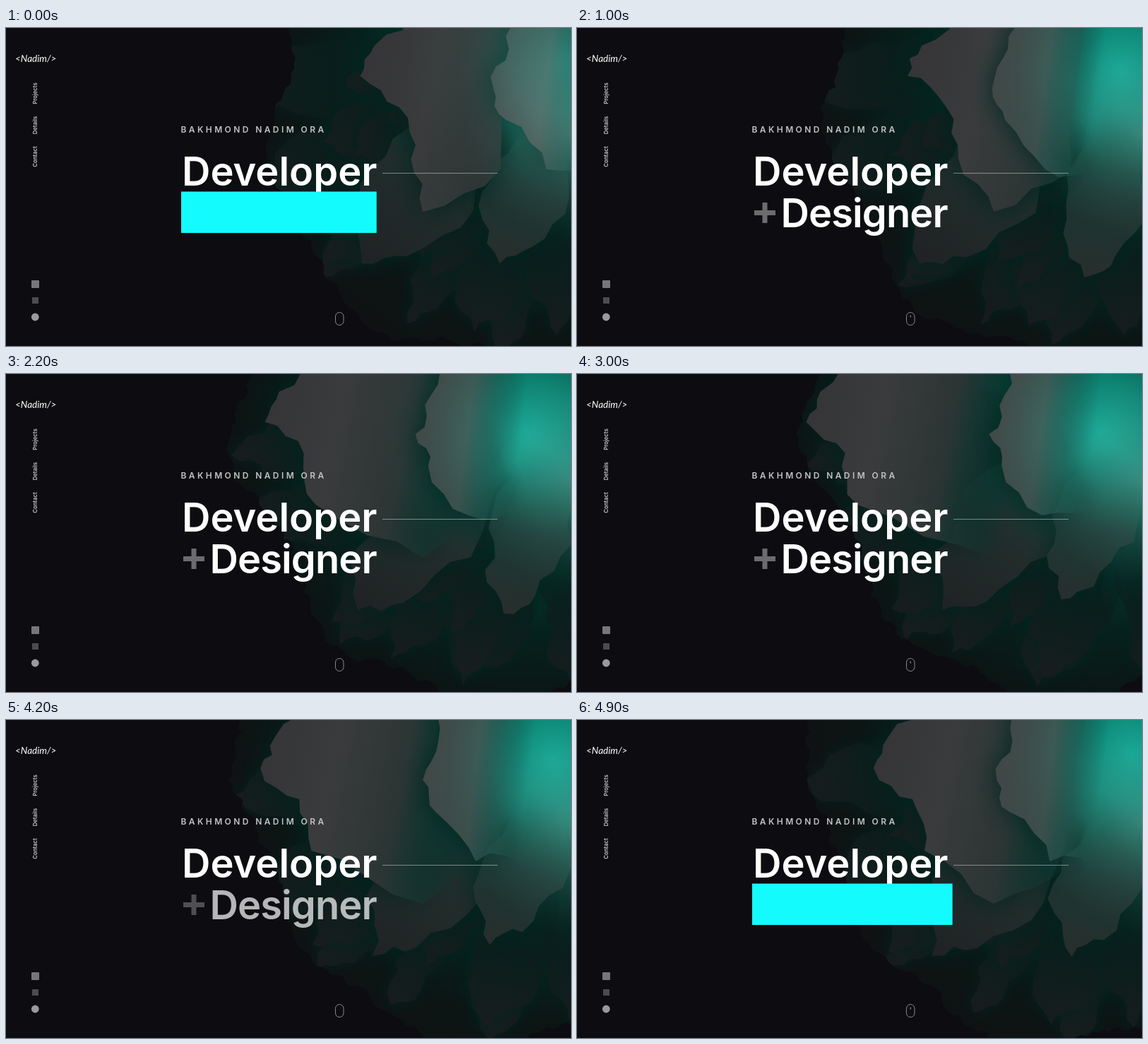
Recreate the animation shown at these times as an HTML page with a canvas. Size 800 by 450 pixels, loop 5000 ms.

```html
<!DOCTYPE html>
<html lang="en">
<head>
<meta charset="utf-8">
<title>Portfolio hero</title>
<style>
  html, body { margin: 0; width: 100%; height: 100%; overflow: hidden; background: #0d0c10; }
  canvas, svg { position: absolute; left: 0; top: 0; width: 800px; height: 450px; }
  text { font-family: Inter, "Open Sans", sans-serif; font-weight: 600; fill: #fff; }
  .big { font-size: 56px; }
  .nav text { font-size: 7.7px; fill: #cacacc; text-anchor: middle; }
</style>
</head>
<body>
<canvas id="stage" width="800" height="450"></canvas>
<svg viewBox="0 0 800 450">
  <text x="13" y="48" style="font:italic 13.5px Lato,sans-serif">&lt;Nadim/&gt;</text>
  <g class="nav">
    <text transform="translate(44 92.5) rotate(-90)">Projects</text>
    <text transform="translate(44 137.5) rotate(-90)">Details</text>
    <text transform="translate(44 182) rotate(-90)">Contact</text>
  </g>
  <rect x="36" y="357" width="11" height="11" rx="1" fill="#77777a"/>
  <rect x="37" y="381" width="9" height="9" fill="#4c4c4f"/>
  <circle cx="41.3" cy="409" r="5.4" fill="#9a9a9c"/>
  <text x="247.5" y="147.5" style="font-size:12px;letter-spacing:3.4px;fill:#c2c2c4">BAKHMOND NADIM ORA</text>
  <path d="M533 205.5H696" stroke="#fff" stroke-opacity=".42"/>
  <text class="big" x="249" y="223.3">Developer</text>
  <g id="role">
    <path d="M251 261.5h30M266 247v29" stroke="#6c6c6e" stroke-width="7"/>
    <text class="big" x="288.5" y="281.7" letter-spacing="-.9">Designer</text>
  </g>
  <rect id="bar" x="248" y="231.5" height="58.5" fill="#14fbfd"/>
  <rect x="466.5" y="402.5" width="11.5" height="18" rx="5.7" fill="none" stroke="#8a8a8c"/>
  <path id="wheel" d="M472.2 406.5v3" stroke="#aaa"/>
</svg>
<script>
const $ = id => document.getElementById(id);
const ctx = $('stage').getContext('2d');
const LOOP = 5000;
const HEART = [790, 50];

const clamp = v => Math.max(0, Math.min(1, v));
const ease = u => u < .5 ? 4 * u ** 3 : 1 - 4 * (1 - u) ** 3;
const rnd = i => { const v = Math.sin(i * 127.1) * 43758.5453; return v - Math.floor(v); };
const polar = (r, a) => [HEART[0] + r * Math.cos(a), HEART[1] + r * Math.sin(a)];

// splits every side twice and pushes the new points sideways
function rough(pts, seed, s, amp = 8) {
  for (let pass = 0; pass < 2; pass++) {
    pts = pts.flatMap((p, i) => {
      const q = pts[(i + 1) % pts.length];
      const dx = q[0] - p[0], dy = q[1] - p[1], len = Math.hypot(dx, dy) || 1;
      const d = Math.min(amp / len, .2) * Math.sin(rnd(seed + i + pass * 40) * 6.28 + s * 1.1);
      return [p, [p[0] + dx / 2 - dy * d, p[1] + dy / 2 + dx * d]];
    });
  }
  return pts;
}

function trace(pts) {
  ctx.beginPath();
  pts.forEach(p => ctx.lineTo(p[0], p[1]));
  ctx.closePath();
}

function paint(g, colors) {
  colors.forEach((c, i) => g.addColorStop(i / (colors.length - 1), c));
  return g;
}
const linear = (a, b, ...colors) => paint(ctx.createLinearGradient(...a, ...b), colors);
const radial = (x, y, r, ...colors) => paint(ctx.createRadialGradient(x, y, 0, x, y, r), colors);

function shape(pts, fill, blur) {
  trace(pts);
  ctx.shadowColor = '#00241e';
  ctx.shadowBlur = blur;
  ctx.fillStyle = fill;
  ctx.fill();
  ctx.shadowBlur = 0;
}

function petal(base, tip, w, seed, s, blur, ...colors) {
  const dx = tip[0] - base[0], dy = tip[1] - base[1], len = Math.hypot(dx, dy);
  const at = (u, k) => [base[0] + dx * u - dy / len * w * k, base[1] + dy * u + dx / len * w * k];
  const pts = [at(0, .4), at(.45, 1), at(.78, .8), at(1, .1), at(.85, -.5), at(.5, -1), at(0, -.4)];
  shape(rough(pts, seed, s), linear(base, tip, ...colors), blur);
}

function cover(fill) {
  ctx.fillStyle = fill;
  ctx.fillRect(0, 0, 800, 450);
}

// jagged outline of the whole flower; its upper left swells mid-loop
function rim(s) {
  const pts = [];
  for (let i = 0; i <= 26; i++) {
    const a = 1.45 + i * .072;
    const swell = 60 * clamp((a - 2.7) * 3) * clamp(s / 2);
    const r = 395 + 58 * Math.sin(2 * (a - 1.57)) * (a < 3.14) + swell + (i % 2 ? 13 : -13) * Math.sin(i * 2.4 + s * .8);
    pts.push(polar(r, a));
  }
  return rough([...pts, [900, -300], [900, 600]], 5, s);
}

// s is the time in seconds
function flower(s) {
  const turn = Math.cos(s * 2 * Math.PI / 5);
  const glow = [762 + 24 * turn, 66 - 20 * turn];
  cover('#0d0c10');
  ctx.save();
  trace(rim(s));
  ctx.clip();
  cover(radial(...glow, 470, '#0c8472', '#0a6557', '#063c34', '#06211d', '#0b1514', '#101113'));

  // dim petals, from the rim inwards
  for (let i = 0; i < 17; i++) {
    const r = 490 - i * 15, a = 1.5 + 1.7 * rnd(i + 3) + .06 * Math.sin(s * 1.2 + i);
    petal(polar(r * .4, a), polar(r, a), 36 + 24 * rnd(i + 60), i * 9, s, 18,
      'rgba(4,40,34,.05)', 'rgba(13,28,27,.6)', 'rgba(27,28,30,.85)');
  }

  // low petals
  const sway = 20 * Math.sin(s * 1.3);
  petal([690, 90], [510 - sway, 338], 76, 21, s, 30, 'rgba(6,90,76,0)', 'rgba(40,48,47,.8)', '#202224');
  petal([775, 110], [705 + sway, 335 + sway], 60, 33, s, 34, 'rgba(8,110,92,0)', 'rgba(30,58,54,.8)', '#292e2d');

  // upper left petal swings out and back
  const x = 412 + 90 * Math.cos(s - .1);
  shape(rough([[x + 90, -30], [x + 20, 25], [x, 68], [x + 55, 112], [x + 72, 185], [590, 260], [700, 200], [720, -40]], 71, s),
    linear([x, 60], [x + 300, 120], '#353537', '#3a3b3c', '#2b3534', 'rgba(6,66,56,0)'), 40);

  // inner petal slides in, then drifts
  const ix = 565 + 125 * Math.exp(-2 * s) + 6 * s;
  shape(rough([[ix + 35, -40], [ix + 22, 30], [ix, 85], [ix + 18, 130], [ix + 75, 200], [ix + 160, 200], [ix + 220, -40]], 90, s),
    linear([ix, 60], [ix + 150, 80], '#414545', '#3b4b48', 'rgba(16,100,88,0)'), 36);

  ctx.globalCompositeOperation = 'screen';
  cover(radial(...glow, 220, 'rgba(12,110,95,.6)', 'rgba(10,100,86,.4)', 'rgba(4,60,50,.12)', 'rgba(0,50,40,0)'));
  cover(radial(800, 150, 150, 'rgba(110,100,100,.4)', 'rgba(84,78,78,.22)', 'rgba(60,56,56,0)'));
  ctx.restore();
}

function draw(now) {
  const t = Math.floor(now % LOOP / 100) * 100;
  flower(t / 1000);

  const late = t > 4000;
  const width = late ? 286 : 279;
  const right = width * ease(clamp(late ? (t - 4420) / 550 : (t + 480) / 550));
  const left = late ? 0 : width * ease(clamp((t - 100) / 545));
  $('bar').setAttribute('x', 248 + left);
  $('bar').setAttribute('width', Math.max(0, right - left));
  $('role').setAttribute('opacity', t < 70 ? 0 : 1 - clamp((t - 4100) / 330));

  const p = t % 2000;
  $('wheel').setAttribute('opacity', clamp((p - 250) / 500) * clamp((2000 - p) / 700));
  requestAnimationFrame(draw);
}
requestAnimationFrame(draw);
</script>
</body>
</html>
```
